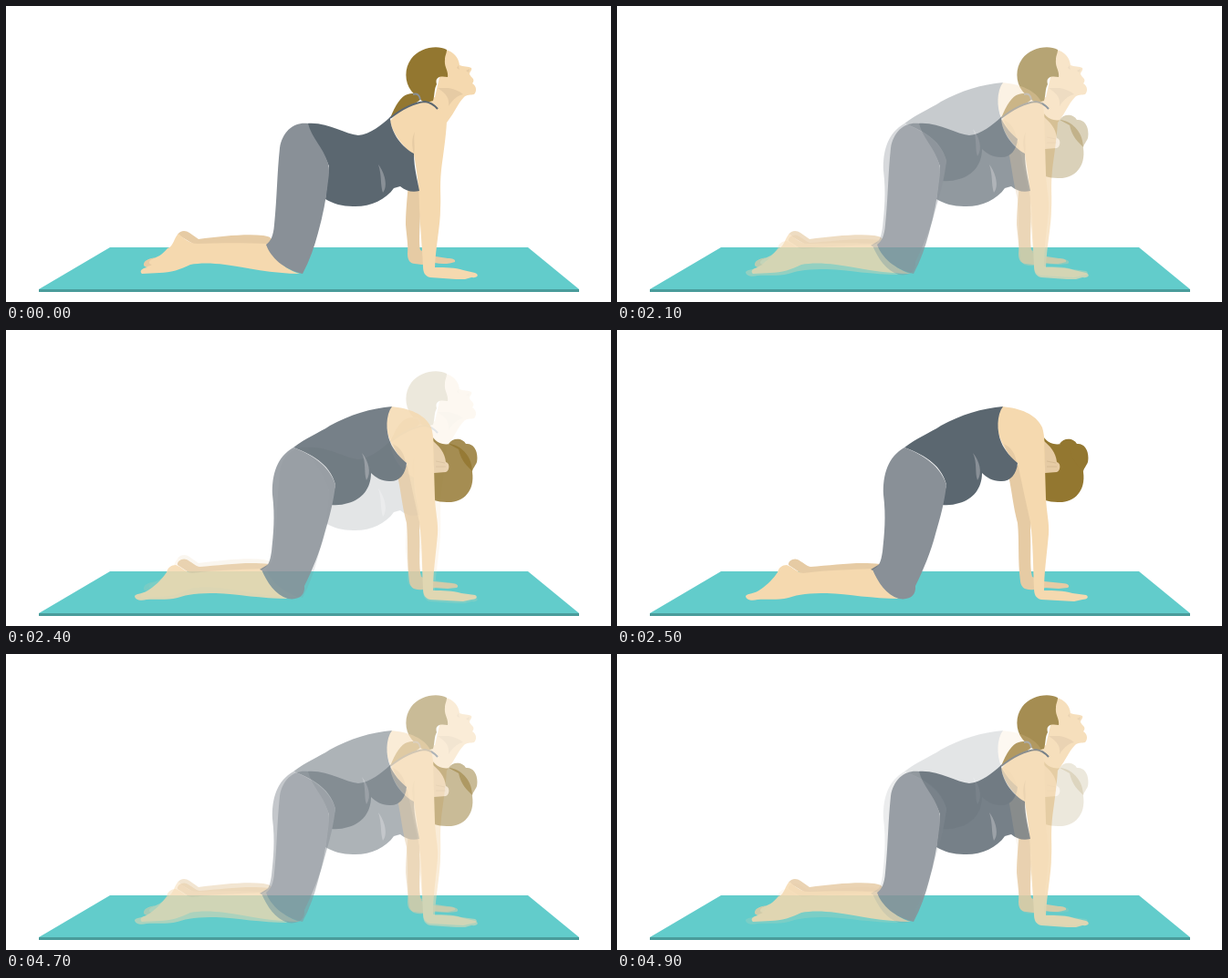
These frames come from a looping animation (663x325 px, 5 s). An HTML page:

```html
<!DOCTYPE html>
<html lang="en">
<head>
<meta charset="utf-8">
<title>Cat and cow stretch</title>
<style>
  html, body { margin: 0; width: 100%; height: 100%; overflow: hidden; background: #fff; }
  svg { display: block; width: 663px; height: 325px; }
  .skin { fill: #f5d9af; }
  .shade { fill: #e6cba4; }
  .hair { fill: #937730; }
  .top { fill: #5b6770; }
  .pants { fill: #899097; }
  .strap { fill: none; stroke: #5b6770; stroke-width: 2; }
  .cat { opacity: 0; }
</style>
</head>
<body>
<svg viewBox="0 0 663 325">
  <path fill="#62cccb" d="M114 265H572L628 311H36Z"/>
  <path fill="#4a9c9b" d="M36 311H628V314H36Z"/>

  <g class="cow">
    <!-- far limbs -->
    <path class="shade" d="M441 195C439 216 438 228 438 240C439 253 441 262 440 272C440 279 443 283 448 283L456 284L470 282C478 284 487 283 492 281C493 278 489 277 484 277L471 275L454 268C452 258 454 240 455 200Z"/>
    <path class="shade" d="M188 251C191 246 197 246 201 249L211 256C235 253 262 250 282 252Q290 253 291 256L287 264L210 264Z"/>
    <!-- near leg -->
    <path class="skin" d="M189 250C194 255 203 262 211 261C235 260 262 260 286 261C291 275 305 289 322 294C293 294 262 287 240 284C225 282 212 282 202 284C192 289 180 293 168 293L149 294C146 292 148 288 155 287C149 286 151 280 157 278C166 277 172 272 177 266C184 264 184 254 189 250Z"/>
    <path class="shade" d="M164 276C158 277 152 279 151 283C150 287 155 287 160 284C155 283 156 279 164 276Z"/>
    <!-- head and neck -->
    <path class="hair" d="M421 123C427 108 433 99 440 97C446 95 453 96 456 101C450 107 440 111 434 114Z"/>
    <path class="skin" d="M482 48C490 50 496 56 497 65C501 67 507 66 510 68C511 71 508 72 508 75L510 78C513 80 513 83 511 85C516 88 516 94 513 97C509 98 505 97 502 100C495 107 493 115 483 128L466 130L456 105L470 100Z"/>
    <path class="shade" d="M473 90H485C491 91 496 93 501 97C494 98 488 105 485 110C486 101 483 97 473 90Z"/>
    <path class="shade" d="M496 65L494 68L497 70L496 67ZM508 69L504 71L507 73Z"/>
    <path class="hair" d="M483 48C472 42 453 46 444 58C436 69 437 84 444 93C449 99 455 105 461 106L468 104C470 98 469 91 472 86C470 79 474 76 484 78C485 71 480 67 481 59C481 54 483 52 483 48Z"/>
    <path fill="none" stroke="#899097" stroke-width="2" d="M446 97Q453 95 454 103"/>
    <!-- near arm -->
    <path class="skin" d="M421 126C431 114 445 105 460 105C470 107 474 112 483 127C482 145 479 164 477 180C475 200 477 209 476 223C476 241 471 263 470 287C482 287 492 287 501 290L514 293C519 295 517 299 510 298L503 300L493 300L465 298C459 297 457 292 457 286C456 265 454 244 453 222C453 199 450 180 447 163C437 157 423 140 421 126Z"/>
    <path class="shade" d="M448 138C444 146 445 154 447 163C449 154 446 148 448 138Z"/>
    <!-- clothes -->
    <path class="top" d="M330 129C353 127 371 141 386 142C399 141 411 131 421 122C421 139 435 156 447 162C447 178 451 191 453 203C445 205 438 203 432 198L425 200C416 213 398 221 380 220C369 220 358 217 350 212L354 176C347 156 334 146 330 129Z"/>
    <path class="strap" d="M421 123C435 112 448 106 459 105Q467 106 473 113"/>
    <path class="pants" d="M408 174C415 183 419 198 413 205C410 196 412 186 408 174Z"/>
    <path class="pants" d="M331 129C316 127 303 137 300 156C297 184 297 211 294 240C293 253 290 258 285 262C290 276 304 289 325 294C333 279 338 264 342 249C347 231 351 211 353 192Q355 180 353 173C347 154 335 145 331 129Z"/>
  </g>

  <g class="cat">
    <!-- far limbs -->
    <path class="shade" d="M429 160L441 146L455 200L453 220C454 244 452 260 455 271L468 276L488 278C494 278 497 281 494 283L484 284L470 283L457 285C447 286 443 283 442 276C439 252 441 232 439 212C434 193 433 178 429 160Z"/>
    <path class="shade" d="M188 258C187 254 193 250 198 252C204 255 207 259 212 260C237 258 265 254 288 257L283 265L203 268Z"/>
    <!-- near leg -->
    <path class="skin" d="M186 258C192 260 197 266 204 267C226 264 258 263 280 262C286 276 295 290 309 295C280 295 254 290 230 289C211 289 199 290 188 294C175 297 164 295 154 296C147 298 141 296 141 292C143 289 151 290 157 285C166 279 172 272 176 266C177 261 181 258 186 258Z"/>
    <!-- head -->
    <path class="hair" d="M467 117C474 126 481 126 487 125C501 128 511 140 511 156C514 177 501 190 483 189Q475 189 469 187Z"/>
    <path class="shade" d="M468 122C474 127 481 134 482 145C487 146 486 155 482 156L469 157Z"/>
    <path fill="none" stroke="#d6bb94" d="M471 144L481 146M471 150H482"/>
    <!-- near arm -->
    <path class="skin" d="M422 84C442 86 459 92 466 107C469 116 469 132 469 151L470 185C471 202 474 213 473 224C471 247 468 267 468 286C479 286 489 286 499 289L514 291C518 293 515 296 510 296L501 298L465 296C459 295 457 290 457 284C456 260 456 233 453 211C448 188 444 170 439 146C429 139 416 119 417 102Q417 90 422 84Z"/>
    <path class="shade" d="M424 125C432 129 437 136 438 147C432 141 427 134 424 125Z"/>
    <!-- clothes -->
    <path class="top" d="M315 129C329 118 343 113 355 105C377 93 400 86 423 84C416 93 416 111 421 123C425 133 433 141 439 146C438 159 430 167 420 166C412 166 405 162 400 157C400 174 390 186 375 190Q366 193 356 192L361 170C356 150 340 138 315 129Z"/>
    <path class="pants" d="M390 135C397 143 401 157 395 165C392 157 395 146 390 135Z"/>
    <path fill="#707980" d="M278 263L288 257L287 266Z"/>
    <path class="pants" d="M315 129C297 139 291 159 292 181C295 205 293 224 291 243C289 255 288 259 280 263C286 277 295 291 309 295C321 297 328 291 327 281C336 263 344 243 349 224C354 207 359 189 361 170C355 150 336 137 315 129Z"/>
  </g>
  <path class="hair cat" d="M485 125C490 117 501 119 504 125C513 124 518 134 516 145C514 150 512 151 511 155C505 149 499 144 496 131Z"/>
</svg>
<script>
  const LOOP = 5000, STEP = 100, LEVELS = 6;
  const fades = [{ start: 2000, toCat: true }, { start: 4500, toCat: false }];

  function fadeFrames(isCat) {
    const frames = [{ offset: 0, opacity: isCat ? 0 : 1 }];
    for (const { start, toCat } of fades) {
      for (let i = 1; i <= LEVELS; i++) {
        const amount = i / LEVELS;
        frames.push({
          offset: (start + (i - 1) * STEP) / LOOP,
          opacity: toCat === isCat ? amount : 1 - amount
        });
      }
    }
    return frames.map(frame => ({ ...frame, easing: 'step-end' }));
  }

  for (const pose of ['cow', 'cat']) {
    const frames = fadeFrames(pose === 'cat');
    document.querySelectorAll('.' + pose).forEach(part =>
      part.animate(frames, { duration: LOOP, iterations: Infinity }));
  }
</script>
</body>
</html>
```
